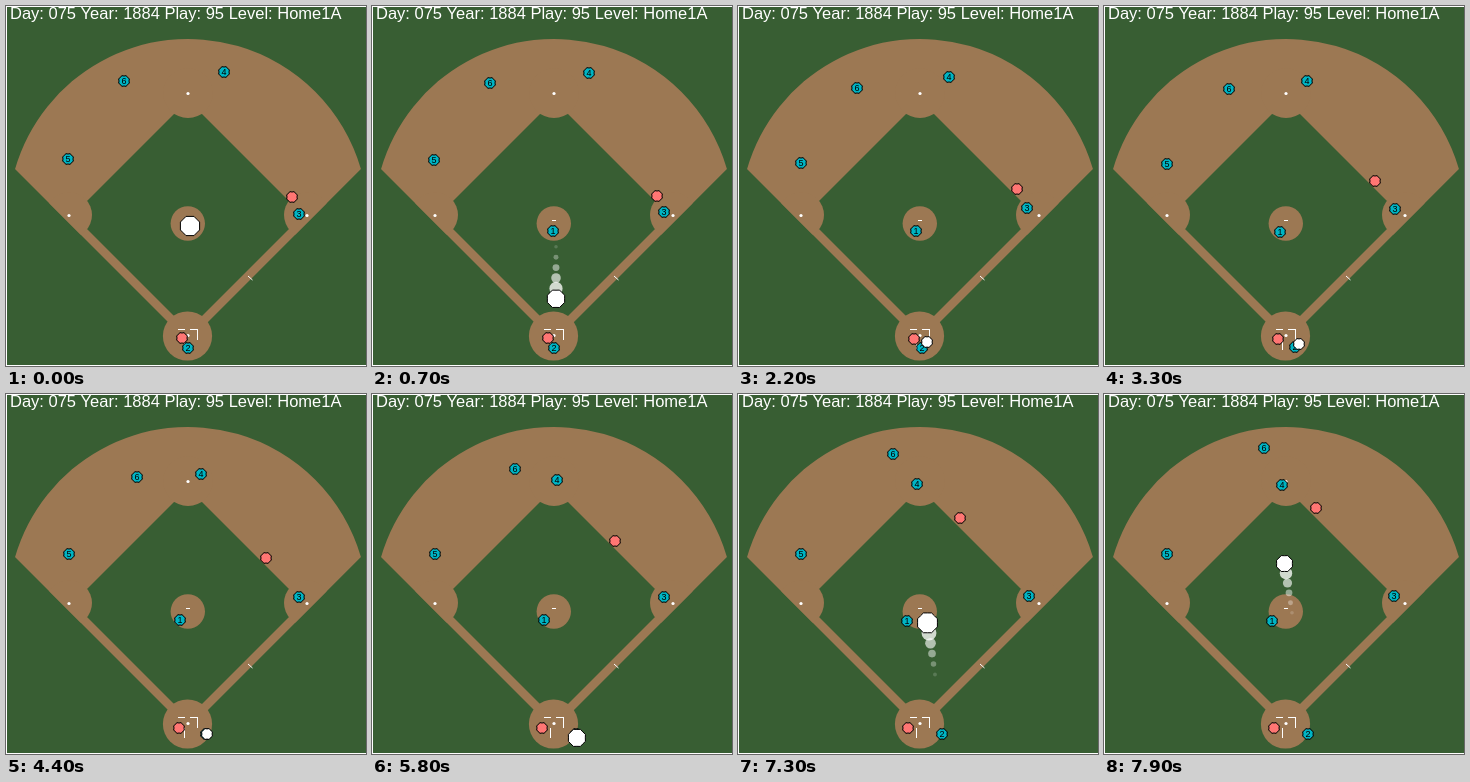
These frames come from a looping animation (360 px wide and 360 px high, 8000 ms). An HTML page with a canvas:

```html
<!DOCTYPE html>
<html lang="en">
<head>
<meta charset="utf-8">
<title>Baseball play</title>
<style>
html, body { margin: 0; width: 100%; height: 100%; overflow: hidden; background: #fff; }
canvas { display: block; }
</style>
</head>
<body>
<canvas id="stage" width="360" height="360"></canvas>
<script>
const ctx = document.getElementById('stage').getContext('2d');
const LOOP = 8000, STEP = 100;
const GRASS = '#385e33', DIRT = '#9c7853', CYAN = '#00b4c3', PINK = '#ff7673';

const linear = u => u;
const smooth = u => u * u * (3 - 2 * u);
const speedUp = u => u ** 1.8;

// Returns a function of time that moves through key points [ms, x, y]
function path(ease, ...keys) {
  return t => {
    let i = 1;
    while (i < keys.length - 1 && t > keys[i][0]) i++;
    const [t0, x0, y0] = keys[i - 1], [t1, x1, y1] = keys[i];
    const p = ease(Math.min(1, Math.max(0, (t - t0) / (t1 - t0))));
    return [x0 + (x1 - x0) * p, y0 + (y1 - y0) * p];
  };
}

// Listed by position number, starting with the pitcher
const fielders = [
  path(linear, [0, 182, 218], [700, 181, 225], [LOOP, 168, 227]),
  path(smooth, [1500, 182, 342], [5500, 204, 340]),
  path(linear, [0, 293, 208], [2000, 289, 202], [4400, 293, 203], [LOOP, 290, 202]),
  path(smooth, [0, 218, 66], [LOOP, 178, 91]),
  path(linear, [0, 62, 153], [4400, 63, 160], [LOOP, 63, 160]),
  path(linear, [0, 118, 75], [2200, 119, 82], [4400, 131, 83], [5800, 143, 75], [LOOP, 161, 53])
];
const runners = [
  path(speedUp, [0, 286, 191], [LOOP, 210, 112]),
  path(linear, [0, 176, 332], [2200, 176, 333], [6000, 170, 334])
];

const PITCH_END = 1200, PICKED_UP = 4400, THROW = 6200;
const looseBall = path(linear, [PITCH_END, 184, 346], [1800, 185, 347], [2200, 189, 336],
  [PICKED_UP, 201, 340], [THROW, 206, 345]);

// Ball position and radius; the radius grows with height
function ballAt(t) {
  if (t <= PITCH_END) {
    const n = t / STEP;
    return [184, 220 + 10.4 * n, 10 - .02 * n * n];
  }
  if (t <= THROW) {
    const lift = Math.max(0, (t - PICKED_UP) / (THROW - PICKED_UP));
    return [...looseBall(t), 5.5 + 4.3 * lift];
  }
  const n = (t - THROW) / STEP;
  return [206 - 1.5 * n, 345 - 11 * n + .04 * n * n, 9.8 + .3 * n - .023 * n * n];
}

function disc(x, y, r, fill) {
  ctx.beginPath();
  ctx.arc(x, y, r, 0, Math.PI * 2);
  ctx.fillStyle = fill;
  ctx.fill();
}

// Disc with a slightly knobbly black outline
function marker(x, y, r, fill) {
  ctx.beginPath();
  for (let i = 0; i < 16; i++) {
    const a = (i + .5) * Math.PI / 8 + Math.PI / 16;
    const d = r + (i % 2 ? -.4 : .4);
    ctx.lineTo(x + d * Math.cos(a), y + d * Math.sin(a));
  }
  ctx.closePath();
  ctx.fillStyle = fill;
  ctx.fill();
  ctx.strokeStyle = '#000';
  ctx.lineWidth = 1;
  ctx.stroke();
}

function rect(x, y, w, h, fill = '#fff') {
  ctx.fillStyle = fill;
  ctx.fillRect(x, y, w, h);
}

function drawField() {
  rect(0, 0, 360, 360);
  rect(1, 1, 359, 358, GRASS);

  ctx.save();
  ctx.beginPath();
  ctx.moveTo(182, 336);
  ctx.lineTo(9, 163);
  ctx.arc(182, 213, 180, Math.atan2(-50, -173), Math.atan2(-50, 173));
  ctx.closePath();
  ctx.fillStyle = DIRT;
  ctx.fill();
  ctx.clip();
  ctx.beginPath();
  for (const [x, y] of [[182, 94], [297, 209], [182, 324], [67, 209]]) ctx.lineTo(x, y);
  ctx.fillStyle = GRASS;
  ctx.fill();
  disc(63, 209, 23, DIRT);
  disc(301, 209, 23, DIRT);
  disc(182, 87, 25, DIRT);
  ctx.restore();

  disc(181.5, 330, 24.6, DIRT);
  disc(181.8, 217.5, 17.2, DIRT);

  for (const [x, y] of [[63, 209], [301, 209], [182, 87], [182, 329]]) {
    disc(x, y + .5, 1.6, '#fff');
  }
  rect(180, 214, 4, 1);
  rect(172, 323, 7, 1);
  rect(184, 323, 8, 1);
  rect(191, 323, 1, 11);
  rect(178, 334, 1, 10);
  ctx.beginPath();
  ctx.moveTo(242, 270);
  ctx.lineTo(246.5, 274);
  ctx.strokeStyle = '#fff';
  ctx.lineWidth = 1;
  ctx.stroke();

  ctx.font = '16.5px "Liberation Sans", Arial, sans-serif';
  ctx.textAlign = 'left';
  ctx.fillStyle = '#fff';
  ctx.fillText('Day: 075 Year: 1884 Play: 95 Level: Home1A', 4, 13);
}

function drawTrail(t) {
  for (let i = 5; i > 0; i--) {
    const past = t - i * STEP;
    if (past < 0) continue;
    const [x, y, r] = ballAt(past);
    if (r > 6) disc(x, y, r * .71 ** i, `rgba(255,255,255,${.92 - i * .15})`);
  }
}

function drawPlayer(track, t, fill, label) {
  const [x, y] = track(t).map(v => Math.round(v));
  marker(x, y, 5.4, fill);
  if (!label) return;
  ctx.font = '9px "Liberation Sans", Arial, sans-serif';
  ctx.textAlign = 'center';
  ctx.fillStyle = '#000';
  ctx.fillText(label, x, y + 3);
}

function draw(now) {
  const t = Math.floor(now % LOOP / STEP) * STEP;
  drawField();
  drawTrail(t);
  fielders.forEach((track, i) => drawPlayer(track, t, CYAN, i + 1));
  runners.forEach(track => drawPlayer(track, t, PINK));
  const [x, y, r] = ballAt(t);
  marker(x, y, r, '#fff');
}

const start = performance.now();
function tick() {
  draw(performance.now() - start);
  requestAnimationFrame(tick);
}
tick();
</script>
</body>
</html>
```
